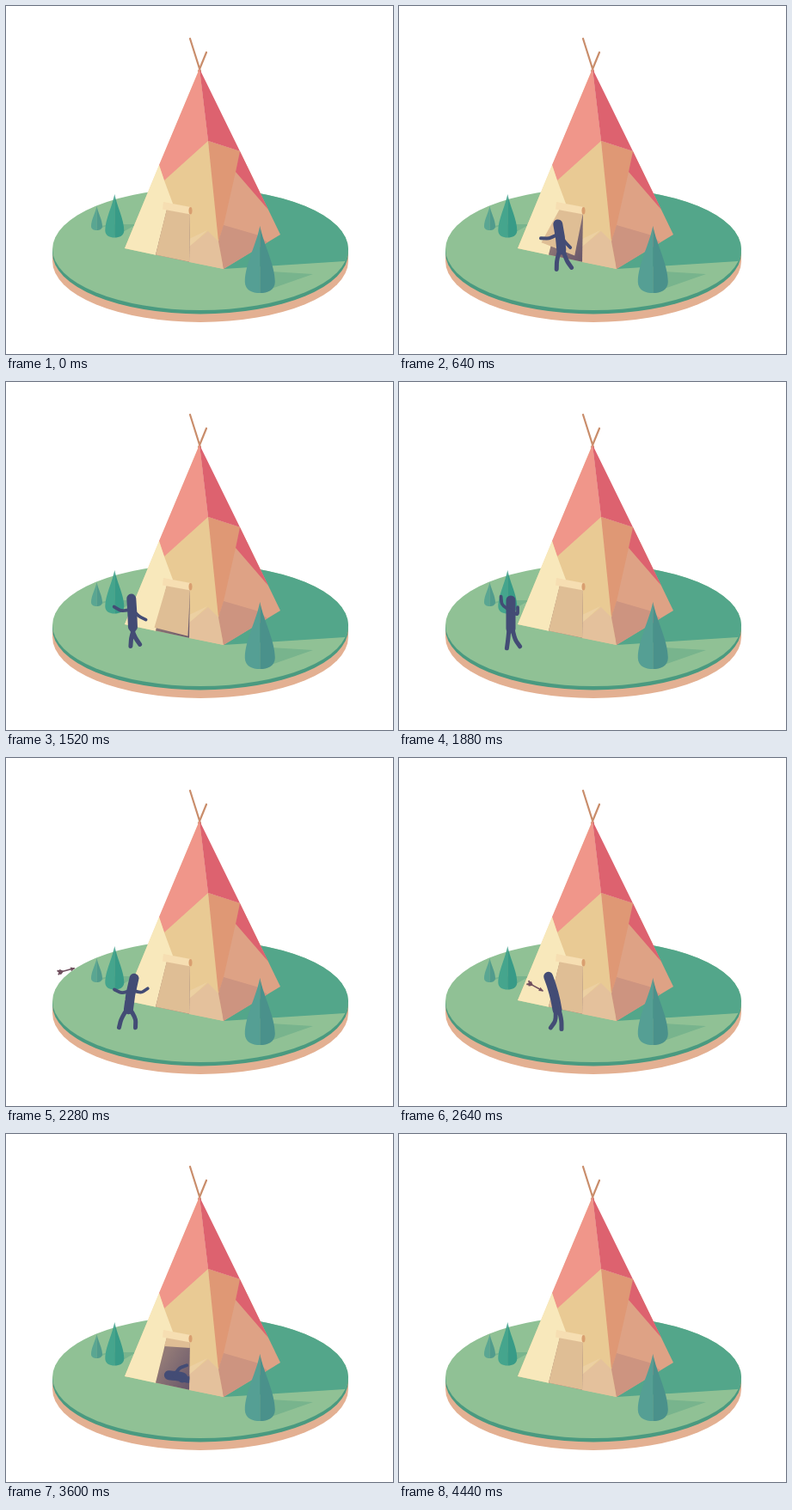
Write an HTML page that moves like this. It is 450 by 405 pixels and loops after 5.34 s.

```html
<!DOCTYPE html>
<html lang="en">
<head>
<meta charset="utf-8">
<title>Tent</title>
<style>
  html, body { margin: 0; width: 100%; height: 100%; overflow: hidden; background: #fff; }
  svg { display: block; width: 450px; height: 405px; }
</style>
</head>
<body>
<svg viewBox="0 0 450 405">
  <defs>
    <clipPath id="disc"><ellipse cx="226" cy="283" rx="172" ry="71"/></clipPath>
    <clipPath id="doorClip"><path d="M187 237L214 241L213 297.7L174 289.5Z"/></clipPath>
    <linearGradient id="dark" x1="0" y1="0" x2="1" y2="1">
      <stop offset=".3" stop-color="#927a77"/><stop offset="1" stop-color="#67566a"/>
    </linearGradient>
  </defs>

  <path fill="#e3b092" d="M54 283V297A172 71 0 0 0 398 297V283Z"/>
  <path fill="#4a9a80" d="M54 283V287.5A172 71 0 0 0 398 287.5V283Z"/>
  <g clip-path="url(#disc)">
    <rect x="50" y="205" width="352" height="155" fill="#90c195"/>
    <path fill="#53a68a" d="M225 200H402V296.5L253 306Z"/>
    <path fill="#78b48d" d="M105 261L119 255L127 268L152 254H128L108 256ZM297 333L357 312L308 309Z"/>
  </g>
  <g id="backTrees"></g>

  <g fill="none" stroke="#c98d6b" stroke-width="2.2" stroke-linecap="round">
    <path d="M214 38L226 76M233 54L224 76"/>
  </g>
  <path fill="#e9ca94" d="M225 73L138 282L253 306L235 157Z"/>
  <path fill="#f0968a" d="M225 73L235 157L184 203L178 185Z"/>
  <path fill="#f8e8bb" d="M178 185L184 203L194 230L187 237L174 289.8L138 282Z"/>
  <path fill="#ecd0a2" d="M213 271L234 261L213 281Z"/>
  <path fill="#e4c19c" d="M213 280L235 262L247 274L253 306L213 298Z"/>
  <path fill="#dea285" d="M235 157L272 169L305 237L319 266L253 306Z"/>
  <path fill="#df9875" d="M235 157L272 169L267 193L253 255L247 274Z"/>
  <path fill="#dd626f" d="M225 73L272 169L235 157ZM272 169L305 237L267 193Z"/>
  <path fill="#cd9480" d="M253 255L291 266L304 275L253 306L247 274Z"/>

  <path fill="url(#dark)" d="M187 237L214 241L213 297.7L174 289.5Z"/>
  <g id="inside" clip-path="url(#doorClip)"></g>
  <path id="flap" fill="#dfbe95"/>
  <path fill="#f6deb2" d="M183 228L214.5 234V242.5L182 236.5Z"/>
  <ellipse cx="214.5" cy="238.3" rx="2" ry="4.3" fill="#d99f70"/>
  <g id="outside">
    <g id="person" fill="none" stroke="#434c75" stroke-linecap="round" stroke-linejoin="round">
      <path id="legs" stroke-width="5"/>
      <path id="torso" stroke-width="11"/>
      <path id="arms" stroke-width="3.8"/>
    </g>
  </g>
  <g id="arrow" fill="none" stroke="#70505f" stroke-linecap="round">
    <path stroke-width="1.5" d="M-18 0H0"/>
    <path stroke-width="2" d="M-19 -2L-16 0L-19 2M-16.5 -2L-14 0L-16.5 2"/>
    <path fill="#70505f" stroke="none" d="M-4 -2.4L1.5 0L-4 2.4Z"/>
  </g>
  <g id="frontTree"></g>
</svg>

<script>
const LOOP = 5340, STEP = 40;
const $ = id => document.getElementById(id);
const mix = (a, b, u) => a + (b - a) * u;
const clamp = u => Math.max(0, Math.min(1, u));

function tree(parent, x, top, base, w, light, shade) {
  const h = base - top, low = base - w * .55;
  const side = s => `M${x} ${top}C${x + s * w * .25} ${top + h * .28} ${x + s * w} ${top + h * .58} ${x + s * w} ${low - w * .2}` +
    `C${x + s * w} ${base - w * .2} ${x + s * w * .5} ${base} ${x} ${base}Z`;
  $(parent).innerHTML += `<path fill="${light}" d="${side(-1)}"/><path fill="${shade}" d="${side(1)}"/>`;
}
tree('backTrees', 105.5, 233, 261, 6.5, '#5aa692', '#519b8c');
tree('backTrees', 126.3, 219, 269.5, 11, '#45a58d', '#389b87');
tree('frontTree', 295.3, 256, 334, 17.5, '#559f94', '#4a918b');

// time, hip x, hip y, lean, torso length, then upper and lower angles: arm L, arm R, leg L, leg R
const poses = [
  [200, 196, 284, 0, 30, -20, -30, 20, 30, -5, -5, 5, 5],
  [600, 190, 284, -8, 30, -60, -90, 30, 40, -20, -5, 20, 40],
  [880, 178, 283, -5, 32, -50, -110, 60, 80, 15, 30, -20, -10],
  [1160, 165, 281, 0, 32, -62, -140, 40, 60, -10, -15, 25, 55],
  [1500, 148, 285, -3, 33, -70, -120, 40, 60, 20, 35, -20, -5],
  [1880, 130, 287, 0, 33, -115, -175, 50, 180, -5, -8, 10, 35],
  [2200, 133, 298, 8, 34, -60, -150, 60, 150, -25, 20, 25, -15],
  [2400, 158, 284, 14, 42, -70, -60, 70, 80, -45, -70, 50, 20],
  [2640, 184, 293, -15, 40, 15, 15, 15, 15, 5, -35, 15, 0],
  [3200, 187, 282, 8, 28, -45, -95, 55, 160, -35, 0, 25, 5],
  [3560, 205, 284, -78, 16, 60, 110, 150, 110, 60, 160, 80, 150]
];

// time, then the lower corners of the door flap
const closed = [174, 289.5, 213, 297.7], rolled = [184, 247, 213.8, 249];
const flapKeys = [
  [200, ...closed],
  [480, 165, 276, 204, 291],
  [1160, 168, 272, 205, 289],
  [1400, 171, 282, 210, 294],
  [1640, ...closed],
  [2880, ...closed],
  [3200, 180, 279, 213, 286],
  [3440, ...rolled],
  [3760, ...rolled],
  [4080, 177, 282, 212, 291],
  [4200, 169, 285, 207, 292],
  [4440, ...closed]
];

function sample(keys, t) {
  const next = keys.findIndex(k => k[0] > t);
  if (next < 0) return keys[keys.length - 1].slice(1);
  if (next === 0) return keys[0].slice(1);
  const a = keys[next - 1], b = keys[next];
  const u = (t - a[0]) / (b[0] - a[0]), eased = mix(u, u * u * (3 - 2 * u), .5);
  return a.slice(1).map((v, i) => mix(v, b[i + 1], eased));
}

const reach = ([x, y], angle, length) => {
  const r = angle * Math.PI / 180;
  return [x + Math.sin(r) * length, y + Math.cos(r) * length];
};

function limb(start, upper, lower, length) {
  const joint = reach(start, upper, length), end = reach(joint, lower, length);
  return { end, d: `M${start}Q${joint} ${joint.map((v, i) => mix(v, end[i], .4))}L${end}` };
}

function drawPerson(t) {
  const [x, y, lean, length, a, b, c, d, e, f, g, h] = sample(poses, t);
  const hip = [x, y], head = reach(hip, 180 - lean, length);
  const shoulder = reach(hip, 180 - lean, length * .64);
  const middle = reach(reach(hip, 180 - lean, length / 2), 90, -lean * .15);
  const armL = limb(shoulder, a, b, 11.5), armR = limb(shoulder, c, d, 10.5);
  $('torso').setAttribute('d', `M${head}Q${middle} ${hip}`);
  $('arms').setAttribute('d', armL.d + armR.d);
  $('legs').setAttribute('d', limb([x - 2, y], e, f, 11.5).d + limb([x + 2, y], g, h, 11.5).d);
  const layer = $(t < 640 || t >= 3360 ? 'inside' : 'outside');
  if ($('person').parentNode !== layer) layer.append($('person'));
  $('person').style.display = t < 200 || t >= 4440 ? 'none' : '';
  return armL.end;
}

// The arrow follows an arc, then stays in the hand that catches it.
function drawArrow(t, hand) {
  const tail = 32 + Math.min(t - 2160, 480) * .248;
  const slope = (tail - 91) / 60 * .55, angle = Math.atan(slope);
  const y = 245.5 + (tail - 91) ** 2 * .0046;
  const caught = clamp((t - 2640) / 200);
  const tipX = mix(tail + 18 * Math.cos(angle), hand[0], caught);
  const tipY = mix(y + 18 * Math.sin(angle), hand[1], caught);
  $('arrow').style.display = t >= 2160 && t < 3440 ? '' : 'none';
  $('arrow').setAttribute('transform', `translate(${tipX} ${tipY}) rotate(${angle * 180 / Math.PI})`);
}

function draw(time) {
  const t = Math.floor(time % LOOP / STEP) * STEP;
  const [lx, ly, rx, ry] = sample(flapKeys, t);
  $('flap').setAttribute('d', `M187 236L214 241L${rx} ${ry}L${lx} ${ly}Z`);
  drawArrow(t, drawPerson(t));
}

const start = performance.now();
function tick() {
  draw(performance.now() - start);
  requestAnimationFrame(tick);
}
tick();
</script>
</body>
</html>
```
